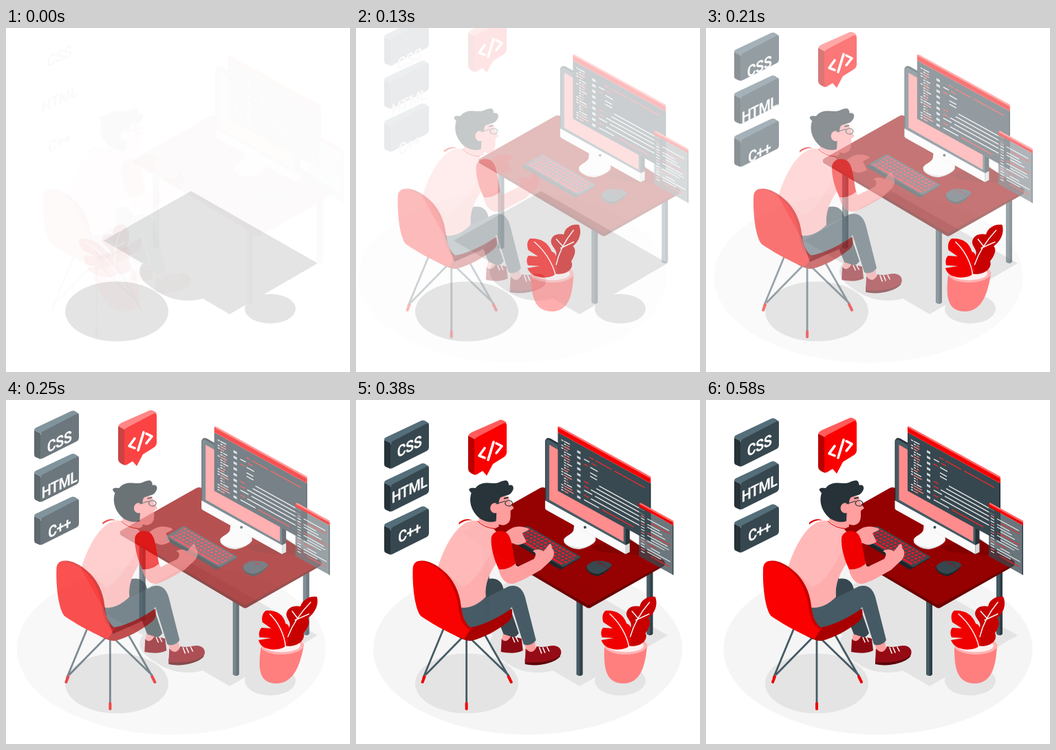
Animation, 500 px wide and 500 px high, one loop 620 ms. Source, as an HTML page:

```html
<!DOCTYPE html>
<html lang="en">
<head>
<meta charset="utf-8">
<title>Developer at a desk</title>
<style>
html, body { margin: 0; width: 100%; height: 100%; overflow: hidden; background: #fff; }
svg { display: block; width: 100vw; height: 100vh; }
text { font: 700 23px Roboto, "Liberation Sans", sans-serif; letter-spacing: -.8px; text-anchor: middle; fill: #fafafa; }
.line { fill: none; stroke-linecap: round; stroke-linejoin: round; }
</style>
</head>
<body>
<svg viewBox="0 0 500 500">
  <ellipse id="floor" cx="250" cy="362" rx="224.5" ry="124.5" fill="#f5f5f5"/>
  <g id="shadows" fill="#e4e4e4">
    <path d="M269 237L453 342L325 416L142 309Z"/>
    <path d="M198 343C191 352 194 365 206 373C220 384 240 398 270 396C284 395 294 391 300 386V340Z"/>
    <ellipse cx="161" cy="412" rx="75" ry="43.5"/>
    <ellipse cx="384" cy="408" rx="37" ry="21.5"/>
  </g>

  <g id="desk">
    <g id="deskLegs"></g>
    <path fill="#6b0000" d="M156 191V194Q156 196 160 198L334 301Q338 304 342 301L446 242Q449 240 449 236Z"/>
    <path fill="#950000" d="M267 128Q271 126 275 128L447 233Q450 236 446 239L342 296Q338 299 334 296L159 194Q154 191 159 189Z"/>
    <path fill="#6b0000" opacity=".45" d="M340 213L396 200L432 226L383 224L352 220Z"/>
    <g transform="matrix(1 .58 -.87 .5 249 183)">
      <path fill="#1c2529" d="M1 4H79V36H1Z"/>
      <rect width="78" height="30" rx="2" fill="#37474f"/>
      <g id="keys" stroke="#dc1c2a" stroke-width="3.8"></g>
    </g>
    <path fill="#1c2529" d="M334 242C334 251 342 254 350 256C358 255 372 245 371 238Z"/>
    <path fill="#37474f" d="M335 241C340 236 347 232 355 234C364 234 372 237 371 241C366 246 358 251 351 253C342 252 334 248 335 241Z"/>
    <path class="line" stroke="#8e1018" d="M348 235Q360 238 366 245M352 240L358 237"/>

    <path fill="#dcdcdc" d="M302 202V207C306 213 316 217 324 217C333 216 348 209 348 203Z"/>
    <path fill="#fafafa" d="M317 178L341 190V195C349 197 350 203 345 207C336 213 328 216 319 214C309 212 300 207 302 202C305 197 316 194 316 188Z"/>
    <g transform="translate(1.5 0)">
      <path fill="#263238" d="M273 60Q273 57 277 55L281 56L393 121Q396 123 396 127V221L390 224L273 158Z"/>
      <path fill="#455a64" d="M274 59L277 57Q389 121 390 126V212L274 147Z"/>
      <path fill="#ff8c8c" d="M279 65L387 127V206L279 145Z"/>
      <path fill="#fafafa" d="M273 146L390 211V224L275 160Q273 159 273 157Z"/>
      <path fill="#d9d9d9" d="M390 211L396 208V221L390 224Z"/>
      <circle cx="331" cy="185" r="2" fill="#37474f"/>
    </g>
    <g id="windows"></g>
  </g>

  <g id="person">
    <path fill="#37474f" d="M184 264C196 256 211 259 214 272L237 339C232 346 225 348 217 346L203 310L176 302Z"/>
    <path fill="#ff9f9f" d="M214 340L226 344L225 354L212 350Z"/>
    <path fill="#8a0710" d="M212 347C216 353 222 350 225 344C231 345 236 345 241 347L243 364C234 369 222 368 211 366Z"/>
    <path class="line" stroke="#fff" stroke-width="1.5" d="M228 345L231 352M233 345L236 351"/>
    <path fill="#ff9f9f" d="M244 350L260 348L262 364L250 369Z"/>
    <path fill="#455a64" d="M150 298L190 287L222 271C236 267 243 276 246 286L262 349C258 355 250 358 244 355L227 301L206 322L165 340Z"/>
    <path fill="#5b0208" d="M246 376V384C264 388 288 383 297 373L298 367Z"/>
    <path fill="#960a14" d="M247 361C253 369 260 367 263 358C271 361 280 357 288 357C297 358 300 364 298 370C290 379 270 383 246 381Z"/>
    <path class="line" stroke="#fff" stroke-width="1.6" d="M267 360L270 368M272 360L275 367M278 359L281 365"/>

    <path fill="#ff9f9f" d="M204 208C216 192 226 184 236 184C243 184 249 185 252 188C249 191 243 192 242 194L248 206C240 211 234 212 228 208C222 210 214 214 208 216Z"/>
    <path fill="#ff9f9f" d="M182 163L207 172L208 184L200 188L178 178Z"/>
    <path fill="#ffb9b9" d="M178 176C154 170 132 203 119 244L150 301Q170 305 189 286C187 268 194 252 204 238L212 199L200 187Z"/>
    <path fill="#ffa9a9" d="M121 240L155 272C176 264 188 235 200 218L206 234C194 252 187 268 189 286Q170 305 150 301L119 246Z" opacity=".65"/>
    <path fill="#e00000" d="M150 178C156 173 164 172 169 175C161 174 155 177 150 181Z"/>
    <path class="line" stroke="#e00000" d="M177 176Q187 186 202 187"/>
    <path fill="#ff9f9f" d="M207 243L231 234L234 243L259 231C263 225 262 221 257 220C262 216 269 217 273 220L281 210Q285 207 285 215C290 220 289 227 284 233L269 247C253 256 238 265 228 267C216 268 209 256 207 243Z"/>
    <path fill="#f00000" d="M197 200C200 190 211 188 219 193C227 199 228 217 232 238C225 244 216 247 208 246C201 232 196 214 197 200Z"/>

    <path fill="#ff9f9f" d="M204 139L222 140C224 146 225 150 226 152L230 157L225 161L225 168C225 176 222 181 214 182L203 180L191 160Z"/>
    <path fill="#263238" d="M165 129C168 127 172 128 174 128C180 120 190 120 199 121C208 122 212 116 219 117C223 119 222 123 223 124C228 122 231 127 228 132C224 140 217 138 210 142C207 147 209 152 205 157L204 176C197 179 183 177 175 167C168 159 164 147 168 135C166 133 164 131 165 129Z"/>
    <ellipse cx="202.5" cy="157" rx="7" ry="7.5" fill="#ff9f9f"/>
    <path class="line" stroke="#263238" stroke-width="1.2" d="M204 151L217 147M217 150Q219 144 226 147Q230 151 225 154Q218 155 217 150"/>
    <path class="line" stroke="#263238" stroke-width="1.8" d="M216 143L221 142"/>
  </g>

  <g id="chair">
    <path class="line" stroke="#455a64" stroke-width="2.8" d="M127 334L98 404M155 345L102 399M161 345V442M166 346L222 400M188 342L224 405"/>
    <path class="line" stroke="#f00000" stroke-width="4" d="M100 402L97 410M161 441V449M222 402L226 410"/>
    <path fill="#a80000" d="M158 331C176 332 205 318 227 303C228 312 228 317 222 322C206 335 185 346 168 350C158 351 146 343 138 338Z"/>
    <path fill="#c90000" d="M87 236C98 229 116 238 127 248C142 260 151 279 153 299C155 316 160 327 170 333L157 342L100 300Z"/>
    <path fill="#fa0000" d="M83 246C83 232 95 232 107 238C130 248 145 270 149 300C151 318 156 329 166 334L158 347C140 342 109 324 96 315C87 309 82 273 83 246Z"/>
  </g>

  <g id="plant">
    <path fill="#ff7f7f" d="M361 360C361 390 365 412 391 412C416 412 422 385 423 355Z"/>
    <ellipse cx="392" cy="357" rx="31" ry="13" fill="#ffb3b3"/>
    <ellipse cx="392" cy="357" rx="26" ry="9.5" fill="#fff0f0"/>
    <path fill="#c80000" d="M394 357C388 345 392 336 398 331C401 322 391 318 391 310C392 302 399 298 410 300C411 291 421 284 432 286C437 298 432 310 423 317C429 323 424 333 420 339C425 349 413 361 394 357Z"/>
    <path fill="#f00000" d="M391 361C378 365 361 362 356 349L374 346L357 345C354 338 356 333 358 331L372 332L358 323C355 315 357 308 361 306C375 305 387 311 392 325C400 327 399 337 396 343C402 350 399 359 391 361Z"/>
    <path class="line" stroke="#fff" stroke-width="1.4" d="M367 311C381 323 393 341 397 360M424 294C409 312 402 327 398 344M399 307L408 317M405 320L424 311"/>
  </g>

  <g id="bubble">
    <path fill="#b80000" d="M163 49L173 53V106Q163 103 163 97Z"/>
    <path fill="#ff5c5c" d="M163 49Q164 46 168 44L209 26Q213 25 219 30L174 55Z"/>
    <path fill="#fa0000" d="M172 57Q172 53 176 51L214 31Q219 29 219 34V73Q219 77 215 80L199 90L190 107L184 100L176 105Q172 107 172 103Z"/>
    <path class="line" stroke="#fff" stroke-width="3.6" d="M187 67L179 78L187 81M192 84L200 58M204 60L212 64L204 74"/>
  </g>
  <g id="tags"></g>
</svg>
<script>
const $ = id => document.getElementById(id);
const WHITE = '#f0f0f0', RED = '#f02a2a';

// Horizontal stroke in a window's own plane
const bar = (x1, x2, y, color, w = 1.5) =>
  `<path d="M${x1} ${y}H${x2}" stroke="${color}" stroke-width="${w}"/>`;
const rows = (n, fn) => Array.from({ length: n }, (_, i) => fn(i)).join('');
const noise = i => { const v = Math.sin(i * 12.9898 + 4) * 43758.5453; return v - Math.floor(v); };

const leg = (x, top, bottom) =>
  `<path fill="#455a64" d="M${x} ${top}h9V${bottom - 2}q-4.5 4 -9 0Z"/>
   <path fill="#2f3e46" d="M${x + 5} ${top}h4V${bottom - 2}q-2 2 -4 2Z"/>`;
$('deskLegs').innerHTML = leg(184, 200, 321) + leg(422, 240, 342) + leg(320, 285, 401);

$('keys').innerHTML = rows(5, i =>
  `<path d="M3 ${4 + i * 5.5}H75" stroke-dasharray="${i == 4 ? '9 1.5 26 1.5' : '3.6 1.5'}" stroke-dashoffset="${i}"/>`);

// Editor window: sidebar list, line markers, then code
const sidebar = rows(20, i => {
  const x = 5 + 4 * (noise(i) > .6);
  return bar(x, x + 3, 17 + i * 3.8, WHITE) + bar(x + 4, 14 + 9 * noise(i + 40), 17 + i * 3.8, i % 4 ? '#ff8080' : WHITE);
});
const markers = rows(9, i => bar(28, 33, 21 + i * 8.2, '#cfd8dc', 3.5));
const code = [
  [46, 52, 20, RED], [55, 78, 20, RED], [82, 126, 20, RED],
  [38, 46, 27, WHITE], [49, 56, 27, RED],
  [38, 44, 34, RED], [47, 58, 34, WHITE],
  [47, 57, 42, WHITE], [47, 57, 47, WHITE],
  [60, 126, 54, WHITE], [38, 45, 59, RED], [56, 126, 60, WHITE],
  [38, 45, 66, RED], [48, 126, 66, WHITE], [38, 50, 72, WHITE], [54, 126, 72, WHITE],
  [38, 45, 79, RED], [48, 120, 79, WHITE], [38, 60, 86, WHITE], [64, 110, 86, RED]
].map(l => bar(...l)).join('');
const notes = rows(14, i => {
  const y = 17 + i * 4, x = 12 + 5 * (i % 3 == 1);
  return bar(3, 8, y, i % 3 ? WHITE : '#ff8080', 1.2) +
    bar(x, 26 + 20 * noise(i + 9), y, i % 4 == 1 ? RED : WHITE, 1.2);
});
const pane = (x, y, w, h, title, alpha, content) =>
  `<g transform="matrix(1 .55 0 1 ${x} ${y})">
    <path fill="#37474f" fill-opacity="${alpha}" d="M0 ${title}H${w}V${h}H0Z"/>
    <path fill="#f50000" d="M0 2Q0 0 2 0H${w - 2}Q${w} 0 ${w} 2V${title}H0Z"/>
    <path fill="#ff6b6b" d="M1 0L3 -1H${w}V2H1Z"/>
    <path fill="#263238" fill-opacity="${alpha}" d="M${w - 1.5} ${title}h1.5V${h}h-1.5Z"/>
    ${rows(3, i => `<circle cx="${w - 4 - i * 4}" cy="${title / 2 + 1}" r="1" fill="#a80000"/>`)}
    ${content}
  </g>`;
$('windows').innerHTML =
  pane(293, 38, 135, 94, 9, 1, sidebar + markers + code) +
  pane(411, 149, 50, 78, 6, .75, notes);

$('tags').innerHTML = ['CSS', 'HTML', 'C++'].map((word, i) =>
  `<g transform="translate(0 ${i * 62.5})">
    <g class="box">
      <path fill="#263238" d="M41 55L50 59V97L43 94Q41 93 41 90Z"/>
      <path fill="#546e7a" d="M41 55Q41 52 44 51L95 27Q97 26 100 27L106 31L50 60Z"/>
      <path fill="#37474f" d="M50 62Q50 59 53 57L103 31Q106 30 106 33V66Q106 69 103 71L53 96Q50 98 50 95Z"/>
    </g>
    <g class="word"><text transform="matrix(.866 -.43 0 1 77.5 74)">${word}</text></g>
  </g>`).join('');

// Cubic Bezier easing (.36, -.01) (.5, 1.38), solved by bisection
const bezier = (a, b, s) => 3 * a * s * (1 - s) ** 2 + 3 * b * s * s * (1 - s) + s ** 3;
function ease(x) {
  let lo = 0, hi = 1;
  for (let i = 0; i < 24; i++) {
    const mid = (lo + hi) / 2;
    bezier(.36, .5, mid) < x ? lo = mid : hi = mid;
  }
  return bezier(-.01, 1.38, lo);
}

// Smooth curve through evenly spaced values, two steps apart
function track(values, step) {
  const p = step / 2, i = Math.floor(p), u = p - i;
  const at = j => values[Math.max(0, Math.min(values.length - 1, j))];
  const [a, b, c, d] = [at(i - 1), at(i), at(i + 1), at(i + 2)];
  return b + u / 2 * (c - a + u * (2 * a - 5 * b + 4 * c - d + u * (3 * (b - c) + d - a)));
}
const DROP = [-50, -49, -42, -20, -4, 3, 1.3, 0, 0];
const DASH = [-250, -213, -107, -8, 16, .5, 0, 0, 0];
const LEAN = [20, 16, 1, -6, -8.5, -2.3, 2, 0, 0];
const SHOW = [0, .14, .62, 1, 1, 1, 1, 1, 1];

const LOOP = 620, STEPS = 15;
function place(el, transform, opacity = 1) {
  el.setAttribute('transform', transform);
  el.setAttribute('opacity', Math.max(0, Math.min(1, opacity)));
}
function draw(now) {
  const step = Math.min(STEPS, Math.floor(now % LOOP / LOOP * STEPS + .07) + 1);
  const y = ease(step / STEPS), gap = 30 * (1 - y);
  for (const id of ['floor', 'person', 'chair']) place($(id), `translate(${-gap})`, y);
  place($('desk'), `translate(${gap})`, y);

  const drop = track(DROP, step), shown = Math.max(0, 1 + drop / 50) ** 1.25;
  for (const el of [$('bubble'), ...document.querySelectorAll('.box')])
    place(el, `translate(0 ${drop})`, shown);
  for (const el of document.querySelectorAll('.word')) place(el, `translate(0 ${drop / 2})`);

  place($('plant'), `translate(${track(DASH, step)} 348) skewX(${track(LEAN, step)}) translate(0 -348)`,
    track(SHOW, step));
}
function loop() {
  draw(performance.now());
  requestAnimationFrame(loop);
}
loop();
</script>
</body>
</html>
```
